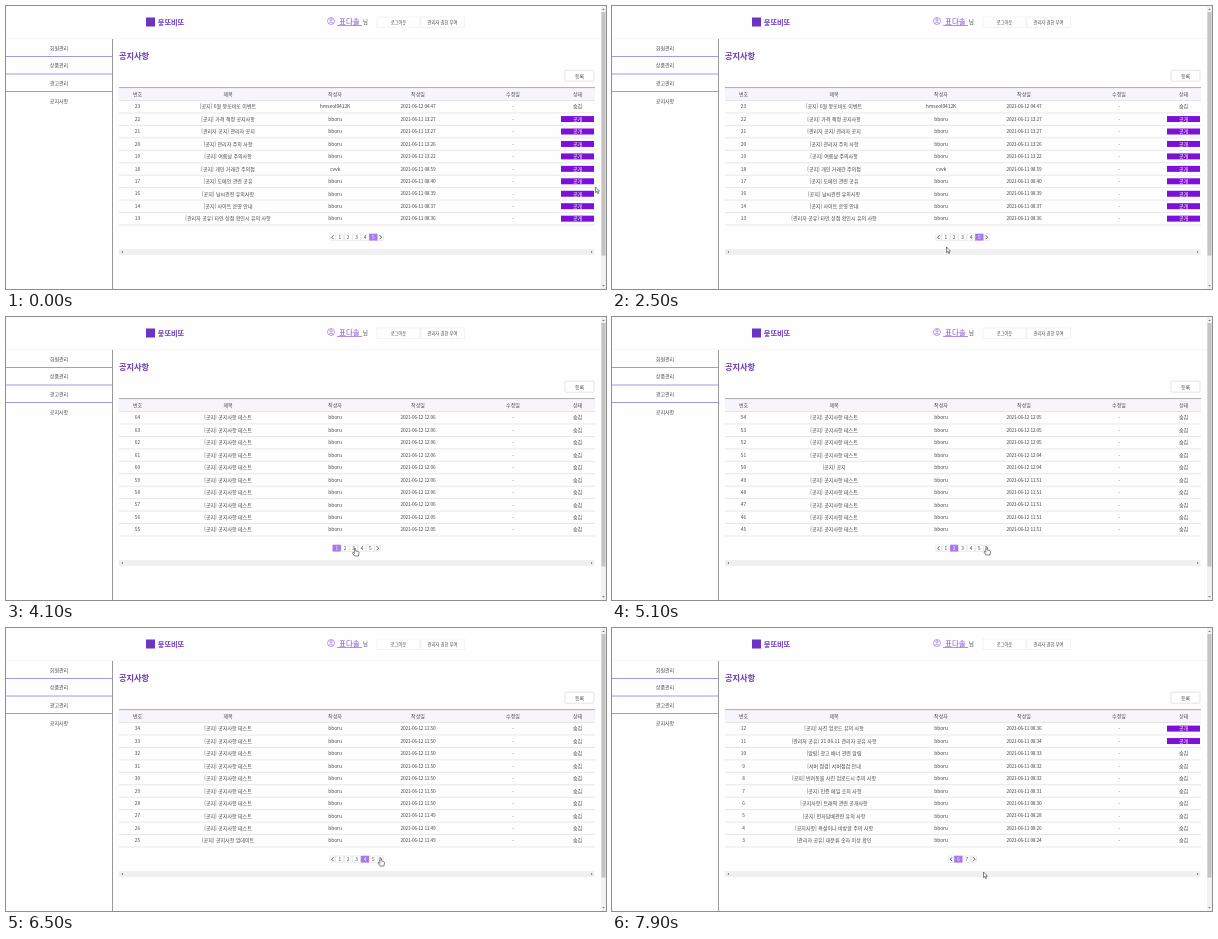
These frames come from a looping animation (600 px wide and 283 px high, 8 s). An HTML page:

```html
<!DOCTYPE html>
<html lang="ko">
<head>
<meta charset="utf-8">
<title>공지사항</title>
<style>
html, body { margin: 0; width: 100%; height: 100%; overflow: hidden; background: #fefefe; }
svg { display: block; width: 100vw; height: 100vh; }
text { font: 5px "Noto Sans CJK KR", "Noto Sans CJK", sans-serif; fill: #484848; text-anchor: middle; }
</style>
</head>
<body>
<svg id="stage" viewBox="0 0 600 283"></svg>
<script>
const LOOP = 8000, STEP = 100, ROW = 12.45;
const PURPLE = '#6a35c4';
const COLS = [131.5, 222, 329, 412, 507, 571.5];

const text = (x, y, s, size = 5, extra = '') =>
  `<text x="${x}" y="${y + size * .36}" style="font-size:${size}px;${extra}">${s}</text>`;
const rect = (x, y, w, h, fill, stroke = 'none', r = 0) =>
  `<rect x="${x}" y="${y}" width="${w}" height="${h}" rx="${r}" fill="${fill}" stroke="${stroke}" stroke-width=".6"/>`;
const line = (x1, y1, x2, y2, color, w = .7) =>
  `<path d="M${x1} ${y1}L${x2} ${y2}" stroke="${color}" stroke-width="${w}"/>`;

// Each row: number, title, time, day, author, open
const row = (no, title, time, day = 11, open = false, author = 'bboru') =>
  ({ no, title, date: `2021-06-${day} ${time}`, open, author });

// Rows of test posts; runs give [count, time]
function testPage(first, runs, titles = {}) {
  const times = runs.flatMap(([n, time]) => Array(n).fill(time));
  return times.map((time, i) =>
    row(first - i, titles[first - i] || '[공지] 공지사항 테스트', time, 12));
}

const PAGES = {
  1: testPage(64, [[8, '12:06'], [2, '12:05']]),
  2: testPage(54, [[3, '12:05'], [2, '12:04'], [5, '11:51']], { 50: '[공지] 공지' }),
  3: testPage(44, [[5, '11:51'], [5, '11:50']]),
  4: testPage(34, [[7, '11:50'], [3, '11:49']], { 25: '[공지] 공지사항 업데이트' }),
  5: [
    row(23, '[공지] 6월 뭉또비또 이벤트', '04:47', 12, false, 'hmseol0412K'),
    row(22, '[공지] 가격 책정 공지사항', '13:27', 11, true),
    row(21, '[관리자 공지] 관리자 공지', '13:27', 11, true),
    row(20, '[공지] 관리자 주의 사항', '13:26', 11, true),
    row(19, '[공지] 여름날 주의사항', '13:22', 11, true),
    row(18, '[공지] 개인 거래간 주의점', '08:59', 11, true, 'cvvk'),
    row(17, '[공지] 도메인 관련 공유', '08:40', 11, true),
    row(16, '[공지] 날씨관련 유의사항', '08:39', 11, true),
    row(14, '[공지] 사이트 운영 안내', '08:37', 11, true),
    row(13, '[관리자 공유] 타인 상점 확인시 유의 사항', '08:36', 11, true)
  ],
  6: [
    row(12, '[공지] 사진 업로드 유의 사항', '08:36', 11, true),
    row(11, '[관리자 공유] 21.06.11 관리자 공유 사항', '08:34', 11, true),
    row(10, '[알림] 광고 배너 관련 알림', '08:33'),
    row(9, '[서버 점검] 서버점검 안내', '08:32'),
    row(8, '[공지] 반려동물 사진 업로드시 주의 사항', '08:32'),
    row(7, '[공지] 인증 메일 조치 사항', '08:31'),
    row(6, '[공지사항] 트래픽 관련 공개사항', '08:30'),
    row(5, '[공지] 전자담배관련 유의 사항', '08:28'),
    row(4, '[공지사항] 욕설이나 비방글 주의 사항', '08:26'),
    row(3, '[관리자 공유] 대분류 숫자 이상 확인', '08:24')
  ]
};

// [time, page]
const TURNS = [[0, 5], [3300, 1], [5100, 2], [5700, 3], [6300, 4], [6800, 5], [7600, 6]];

// [time, x, y] of the pointer tip
const PATH = [
  [0, 589.5, 181], [900, 350, 243], [1100, 350, 243], [1500, 195.5, 199],
  [1700, 195.5, 199], [2500, 334.5, 241], [2600, 335.5, 241], [3100, 333, 231],
  [3300, 333, 231], [4100, 349, 231], [5000, 374.5, 230], [7500, 374.5, 230],
  [7900, 371.5, 244], [8000, 371.5, 244]
];

function frame() {
  const menu = ['회원관리', '상품관리', '광고관리', '공지사항'];
  const heads = ['번호', '제목', '작성자', '작성일', '수정일', '상태'];
  return rect(0, 0, 600, 283, '#fefefe')
    // header
    + rect(140, 11.5, 9, 9, PURPLE)
    + text(165, 16, '뭉또비또', 7.2, `font-weight:700;fill:${PURPLE}`)
    + `<g fill="none" stroke="#8a62d6" stroke-width=".6"><circle cx="325" cy="15" r="3.5"/>
       <circle cx="325" cy="13.8" r="1.2"/><path d="M322.8 17.4Q325 14.6 327.2 17.4"/></g>`
    + text(343.3, 15.2, '표다솔', 7.4, 'font-weight:300;fill:#7a4fd0')
    + line(331, 19.5, 356, 19.5, '#8a62d6')
    + text(359.3, 15.7, '님', 5.6)
    + rect(371, 11, 43, 10.5, '#fefefe', '#ececec') + text(392.5, 16.5, '로그아웃', 4.2)
    + rect(415, 11, 43.5, 10.5, '#fefefe', '#ececec') + text(436.5, 16.5, '관리자 권한 부여', 4.3)
    + line(0, 32.5, 595, 32.5, '#f5f5f5')
    // sidebar
    + line(106.5, 33, 106.5, 283, '#999', 1)
    + menu.map((s, i) => text(53, 41.7 + 17.7 * i, s)).join('')
    + [50.5, 68, 85.5].map(y => line(0, y, 106.5, y, '#a596ea', 1)).join('')
    // content
    + text(128, 50.1, '공지사항', 8.2, 'font-weight:700;fill:#6b3db4')
    + rect(559, 64.2, 29, 11, '#fff', '#d4d4d4', 1) + text(573.5, 69.8, '등록')
    + rect(113, 82, 476, 12.5, '#f8f4fc')
    + line(113, 81.6, 589, 81.6, '#888')
    + heads.map((s, i) => text(COLS[i], 88, s)).join('')
    + Array.from({ length: 11 }, (_, i) => line(113, 94.5 + ROW * i, 589, 94.5 + ROW * i, '#dedede')).join('')
    // scrollbars
    + rect(113, 243, 475.5, 6, '#f0f0f0')
    + rect(595, 0, 5, 283, '#f1f1f1') + rect(595.4, 6, 4.2, 243.5, '#c4c4c4')
    + '<path fill="#777" d="M117 244.7v2.6l-1.6-1.3zM585 244.7v2.6l1.6-1.3zM596.2 4h2.6l-1.3-1.6zM596.2 279h2.6l-1.3 1.6z"/>';
}

function pager(page) {
  const first = page > 5 ? 6 : 1, last = page > 5 ? 7 : 5;
  const cells = [];
  if (page > 1) cells.push('<');
  for (let n = first; n <= last; n++) cells.push(n);
  cells.push('>');
  const width = c => typeof c === 'number' ? 8.4 : 6;
  let x = 350.6 - cells.reduce((sum, c) => sum + width(c), 0) / 2;
  return cells.map(c => {
    const w = width(c), mid = x + w / 2, on = c === page;
    const dir = c === '<' ? -1 : 1;
    const mark = typeof c === 'number'
      ? text(mid, 231.2, c, 4.8, on ? 'fill:#fff' : '')
      : `<path d="M${mid - dir} 229.2l${2 * dir} 2l${-2 * dir} 2" fill="none" stroke="#333" stroke-width=".8"/>`;
    const cell = rect(x + .3, 228, w - .6, 6.2, on ? '#a678ea' : '#fff', on ? '#a678ea' : '#e0e0e0');
    x += w;
    return cell + mark;
  }).join('');
}

function table(page) {
  return PAGES[page].map((r, i) => {
    const y = 100.6 + ROW * i;
    return text(COLS[0], y, r.no, 4.8)
      + text(COLS[1], y, r.title)
      + text(COLS[2], y, r.author, 5, 'letter-spacing:-.1px')
      + text(COLS[3], y, r.date, 4.8, 'letter-spacing:-.2px')
      + text(COLS[4], y, '-')
      + (r.open ? rect(555, y - 3, 33, 6, '#7d10d8') : '')
      + text(COLS[5], y, r.open ? '공개' : '숨김', 5, r.open ? 'fill:#fff' : '');
  }).join('') + pager(page);
}

const stage = document.getElementById('stage');
stage.innerHTML = frame() + '<g id="list"></g>'
  + `<g id="pointer" fill="#fff" stroke="#333" stroke-width=".6" stroke-linejoin="round">
     <path id="arrow" d="M0 0V5.6L1.3 4.5L2.2 6.6L3.1 6.2L2.2 4.1H3.9Z"/>
     <path id="hand" d="M-.7 .5Q0-.5 .7 .5V3L3.4 3.6Q4.1 3.9 4 4.8L3.4 8H-.5L-2.4 5.2Q-2.4 4.2-1.5 4.6L-.7 5.4Z"/></g>`;
const [list, pointer, arrow, hand] =
  ['list', 'pointer', 'arrow', 'hand'].map(id => document.getElementById(id));

function pointerAt(t) {
  const i = PATH.findIndex(p => p[0] > t);
  const [t0, x0, y0] = PATH[i - 1], [t1, x1, y1] = PATH[i];
  const u = (t - t0) / (t1 - t0), e = u * u * (3 - 2 * u);
  return [x0 + (x1 - x0) * e, y0 + (y1 - y0) * e];
}

let shown = 0;
function draw() {
  const t = Math.floor(performance.now() % LOOP / STEP) * STEP;
  const page = TURNS.filter(p => p[0] <= t).pop()[1];
  if (page !== shown) list.innerHTML = table(shown = page);
  const [x, y] = pointerAt(t);
  const onTitle = x > 150 && x < 295 && y > 95 && y < 219;
  const onPager = x > 324 && x < 378 && y > 228 && y < 235;
  const link = onTitle || onPager;
  pointer.setAttribute('transform', `translate(${x} ${y})`);
  arrow.style.display = link ? 'none' : '';
  hand.style.display = link ? '' : 'none';
  requestAnimationFrame(draw);
}
draw();
</script>
</body>
</html>
```
